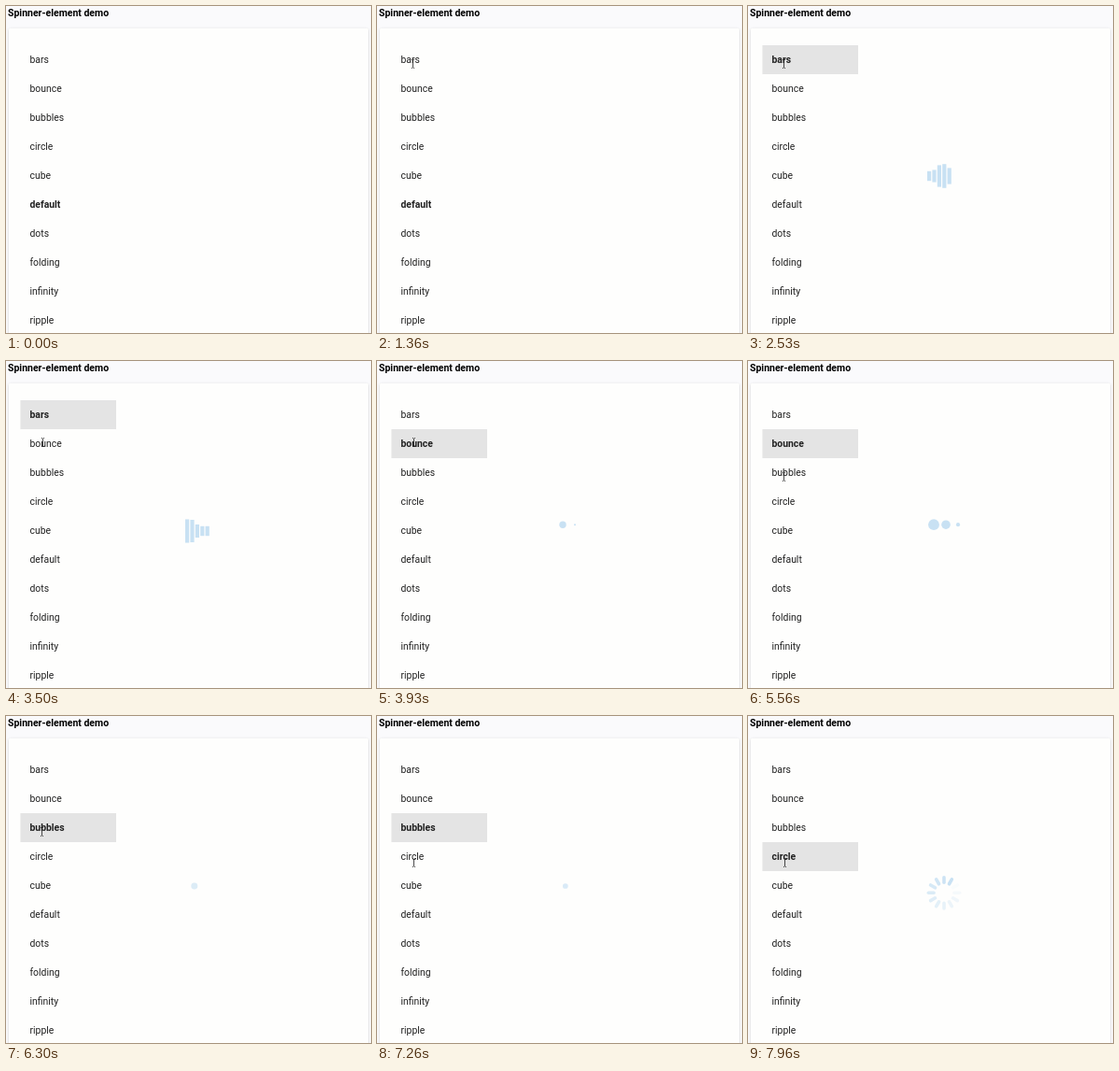
An HTML page with a canvas for the animation above (8000 ms loop, 391 by 350 pixels).

```html
<!DOCTYPE html>
<html lang="en">
<head>
<meta charset="utf-8">
<title>Spinner-element demo</title>
<style>
  html, body { margin: 0; width: 100%; height: 100%; overflow: hidden; background: #fafafc; }
  canvas { display: block; }
</style>
</head>
<body>
<canvas id="stage" width="391" height="350"></canvas>
<script>
const ctx = document.getElementById('stage').getContext('2d');
const LOOP = 8000;
const TINT = '#c8e1f3';
const PRESS_LEAD = 20;
const ROW_TOP = 42, ROW_HEIGHT = 31;
const ITEMS = ['bars', 'bounce', 'bubbles', 'circle', 'cube', 'default',
               'dots', 'folding', 'infinity', 'ripple'];

// Each pick focuses a row, then selects it and starts its spinner.
const PICKS = [
  { row: 0, start: 2020, draw: drawBars },
  { row: 1, start: 3930, draw: drawBounce },
  { row: 2, start: 5880, draw: drawPulse },
  { row: 3, start: 7360, draw: drawCircle }
];

const MOVES = [
  { begin: 780, end: 1360, from: [-4, 80], to: [38.5, 61.5] },
  { begin: 3000, end: 3450, from: [38.5, 61.5], to: [39.5, 87] },
  { begin: 4760, end: 5330, from: [39.5, 87], to: [38.5, 123.5] },
  { begin: 6420, end: 6850, from: [38.5, 123.5], to: [39.5, 157] }
];

const clamp = v => Math.min(1, Math.max(0, v));
const mix = (a, b, k) => a + (b - a) * k;
const mod = (a, n) => ((a % n) + n) % n;

// cubic-bezier(.42, 0, .58, 1)
function easeInOut(x) {
  if (x <= 0 || x >= 1) return clamp(x);
  let lo = 0, hi = 1, s = 0.5;
  for (let i = 0; i < 20; i++) {
    s = (lo + hi) / 2;
    const bx = 1.26 * s * (1 - s) ** 2 + 1.74 * s * s * (1 - s) + s ** 3;
    if (bx < x) lo = s; else hi = s;
  }
  return s * s * (3 - 2 * s);
}

// Rises to 1 at `peak` and is back at 0 at twice that time.
function swell(phase, peak) {
  return phase < peak ? easeInOut(phase / peak) : 1 - easeInOut(phase / peak - 1);
}

function disc(x, y, r) {
  ctx.beginPath();
  ctx.arc(x, y, r, 0, Math.PI * 2);
  ctx.fill();
}

function drawBars(age) {
  for (let i = 0; i < 5; i++) {
    const h = 26 * mix(0.4, 1, swell(mod(age - i * 100, 1200), 240));
    ctx.fillRect(192 + i * 5.4, 182 - h / 2, 4.2, h);
  }
}

function drawBounce(age) {
  for (let i = 0; i < 3; i++) {
    const scale = swell(mod(age + 320 - i * 160, 1400), 560);
    disc(199 + i * 13, 175.2, 5.9 * scale);
  }
}

function drawPulse(age) {
  const k = easeInOut(mod(age, 1000) / 1000);
  ctx.globalAlpha = 1 - k;
  disc(201.8, 182, 9.5 * k);
}

function drawCircle(age) {
  const head = Math.floor(age / 100) - 5;
  ctx.strokeStyle = TINT;
  ctx.lineWidth = 3.6;
  ctx.lineCap = 'round';
  for (let i = 0; i < 12; i++) {
    const a = i * Math.PI / 6, dx = Math.sin(a), dy = -Math.cos(a);
    ctx.globalAlpha = 1 - mod(head - i, 12) / 12;
    ctx.beginPath();
    ctx.moveTo(210 + dx * 11, 189.3 + dy * 11);
    ctx.lineTo(210 + dx * 16.6, 189.3 + dy * 16.6);
    ctx.stroke();
  }
}

function card(shadow, offset, blur) {
  ctx.save();
  ctx.shadowColor = `rgba(0,0,0,${shadow})`;
  ctx.shadowOffsetY = offset;
  ctx.shadowBlur = blur;
  ctx.fillStyle = '#fefefd';
  ctx.beginPath();
  ctx.roundRect(3, 24, 385, 400, 1.3);
  ctx.fill();
  ctx.restore();
}

function label(text, x, y, bold, size, color) {
  ctx.font = `${bold ? 700 : 400} ${size}px Roboto, sans-serif`;
  ctx.fillStyle = color;
  ctx.fillText(text, x, y);
}

function drawCursor(t) {
  const move = MOVES.filter(m => t >= m.begin).pop();
  if (!move) return;
  const k = easeInOut(clamp((t - move.begin) / (move.end - move.begin)));
  const x = Math.round(mix(move.from[0], move.to[0], k) - 0.5);
  const y = Math.round(mix(move.from[1], move.to[1], k));
  ctx.fillStyle = 'rgba(30,30,30,.8)';
  ctx.fillRect(x, y - 4, 1, 8);
  for (const edge of [y - 5, y + 4]) {
    ctx.fillRect(x - 1, edge, 1, 1);
    ctx.fillRect(x + 1, edge, 1, 1);
  }
}

function render(t) {
  const focused = PICKS.filter(p => t >= p.start - PRESS_LEAD).pop();
  const active = PICKS.filter(p => t >= p.start).pop();
  const selected = active ? active.row : ITEMS.indexOf('default');

  ctx.fillStyle = '#fafafc';
  ctx.fillRect(0, 0, 391, 350);
  card(0.14, 1.3, 1.3);
  card(0.12, 0.6, 3.2);
  label('Spinner-element demo', 2, 11, true, 10.5, '#000');

  if (focused) {
    ctx.fillStyle = '#e4e4e4';
    ctx.fillRect(15.4, ROW_TOP + focused.row * ROW_HEIGHT, 102.6, ROW_HEIGHT);
  }
  ITEMS.forEach((name, i) =>
    label(name, 25.5, ROW_TOP + 19.3 + i * ROW_HEIGHT, i === selected, 10.4, '#212121'));

  if (active) {
    ctx.save();
    ctx.fillStyle = TINT;
    active.draw(t - active.start);
    ctx.restore();
  }
  drawCursor(t);
}

const origin = performance.now();
function tick() {
  render((performance.now() - origin) % LOOP);
  requestAnimationFrame(tick);
}
tick();
</script>
</body>
</html>
```
